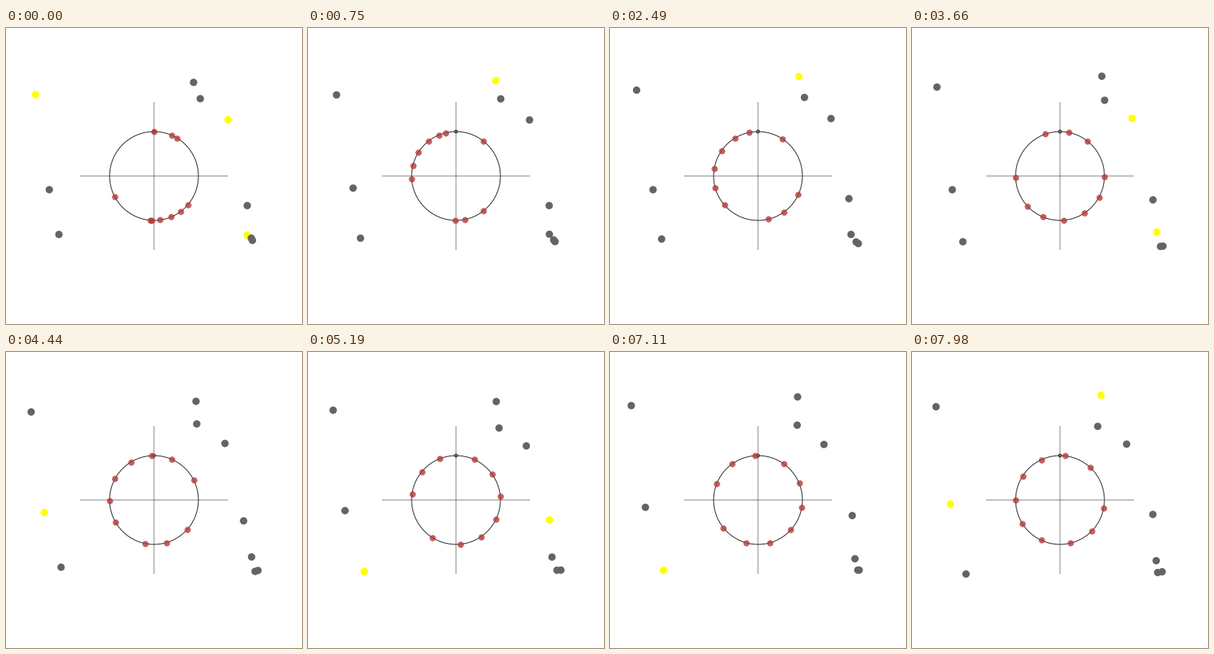
Write a matplotlib script that moves like this. It is 400 px wide and 400 px high and loops after 8000 ms.

```python
import numpy as np
import matplotlib.pyplot as plt
from matplotlib.animation import FuncAnimation
from matplotlib.patches import Circle

SIZE, DPI = 400, 100
PX = 72 / DPI              # points per pixel
FRAMES, LOOP = 267, 8000
MID, R = 200, 60
GREY, GLOW = "#646464", "#ffff00"

SPEED = 5.87               # degrees of phase per frame
FLASH = 62                 # a fly glows from the top to this angle
RELAX = 100                # frames in which the phases spread apart
STEP = 0.7                 # largest random step per frame

START = np.array([(40, 90), (300, 124), (326, 280), (71.5, 279), (326, 240),
                  (262.5, 95.5), (331.5, 284), (333, 287), (58.5, 218.5),
                  (253.5, 73.5)])
END = np.array([(32.5, 74), (290, 124.5), (330, 282), (73, 300), (325.5, 219.5),
                (251, 100.5), (332, 298), (338, 297), (52, 205.5),
                (255.5, 58.5)])
PHASE = np.array([0, 24, 31, 130.5, 143.5, 157.5, 172.5, 183, 185, 242])

rng = np.random.default_rng(7)
walk = rng.uniform(-STEP, STEP, (FRAMES, len(START), 2)).cumsum(axis=0)


def positions(n):
    """Random walk that leads from START to END."""
    k = n / (FRAMES - 1)
    drift = START + (END - START) * k
    return drift + walk[n] - walk[0] * (1 - k) - walk[-1] * k


def angles(n):
    """Clockwise degrees from the top, easing towards an even spread."""
    even = 34 * np.arange(len(PHASE)) - 22
    spread = 1 - np.exp(-n / RELAX)
    return (PHASE + (even - PHASE) * spread + SPEED * n) % 360


fig = plt.figure(figsize=(SIZE / DPI, SIZE / DPI), dpi=DPI, facecolor="white")
ax = fig.add_axes([0, 0, 1, 1])
ax.set_xlim(0, SIZE)
ax.set_ylim(SIZE, 0)
ax.axis("off")

for xs, ys in (((100, 300), (MID, MID)), ((MID, MID), (100, 300))):
    ax.plot(xs, ys, color="black", alpha=0.5, lw=PX, snap=False,
            solid_capstyle="butt", zorder=1)
ax.add_patch(Circle((MID, MID), R, fill=False, ec="#222222", lw=PX, zorder=2))
ax.add_patch(Circle((MID, MID - R), 2, fc="#777777", ec="#222222",
                    lw=PX, zorder=2))


def dots(radius, color, z, alpha=1):
    return ax.scatter([], [], s=(2 * radius * PX) ** 2, c=color, alpha=alpha,
                      linewidths=0, zorder=z)


phases = dots(4.2, "#b53838", 3, 0.8)
flies = dots(5, GREY, 4)


def draw(n):
    turn = angles(n)
    a = np.radians(turn)
    phases.set_offsets(np.c_[MID + R * np.sin(a), MID - R * np.cos(a)])
    flies.set_offsets(positions(n))
    flies.set_facecolor([GLOW if t < FLASH else GREY for t in turn])
    return phases, flies


anim = FuncAnimation(fig, draw, frames=FRAMES, interval=LOOP / FRAMES,
                     init_func=lambda: draw(0), repeat=True, repeat_delay=0)
plt.show()
```
